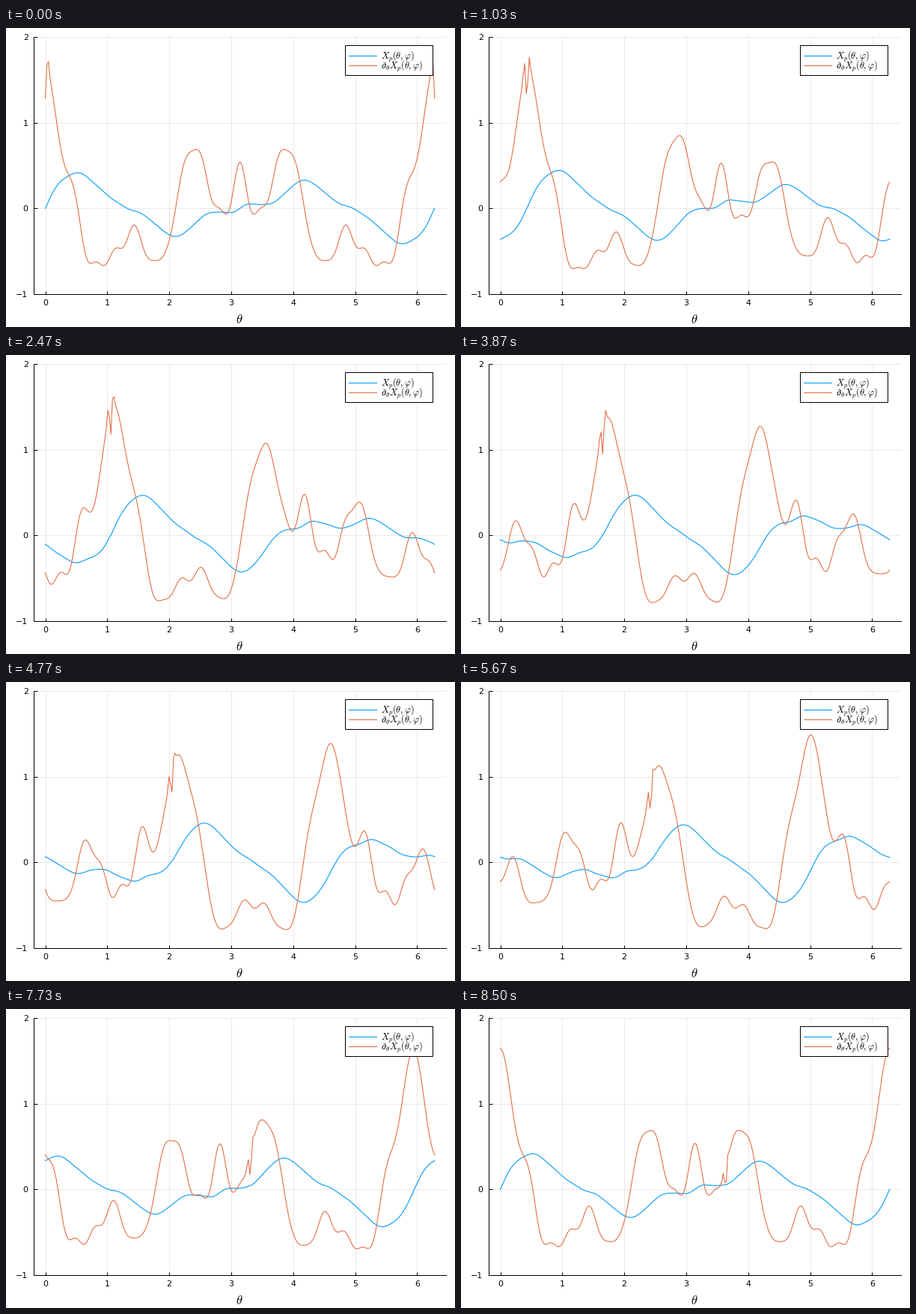
A matplotlib script that plays this animation: 600 px wide and 400 px high, repeating every 8.53 s.

```python
import numpy as np
import matplotlib.pyplot as plt
from matplotlib.animation import FuncAnimation
from matplotlib.lines import Line2D
from matplotlib.patches import Rectangle

W, H, DPI = 600, 400, 100
FRAMES, LOOP = 256, 8530
BLUE, ORANGE = "#009afa", "#e26f46"
PX = 72 / DPI  # one pixel in points

plt.rcParams.update({
    "font.family": "DejaVu Sans",
    "mathtext.fontset": "cm",
    "axes.unicode_minus": True,
})

# Travelling modes: (wave number in theta, wave number in phi, slope amplitude)
MODES = np.array([
    (1, 1, -0.025), (2, 1, 0.54), (3, 2, 0.41), (4, 2, 0.095),
    (5, 3, 0.354), (6, 4, 0.086), (7, 4, -0.14), (8, 5, 0.152),
    (9, 5, -0.03), (10, 6, 0.043), (12, 7, 0.06), (13, 8, 0.035),
    (14, 8, 0.058), (16, 9, 0.02), (17, 10, 0.013), (18, 10, 0.018),
    (19, 11, -0.045), (21, 12, -0.02), (22, 13, 0.02),
])
N, M, A = (col[:, None] for col in MODES.T)
SPEED = 11 / 19
KINK_WIDTH = 0.023

theta = np.linspace(0, 2 * np.pi, 256)


def curves(i):
    """Return X_p and its theta derivative at step i."""
    u = i / (FRAMES - 1)
    phi = 2 * np.pi * u
    phase = N * theta - M * phi
    x = (A / N * np.sin(phase)).sum(axis=0)
    dx = (A * np.cos(phase)).sum(axis=0)

    # narrow kink carried along the characteristic
    d = (theta - SPEED * phi + np.pi) % (2 * np.pi) - np.pi
    s = (d / KINK_WIDTH) ** 2
    bell = (0.36 - 0.17 * u) * np.exp(-s / 2)
    return x - d * bell, dx - (1 - s) * bell


def at(x, y):
    """Pixel position (from top left) to figure fraction."""
    return x / W, 1 - y / H


fig = plt.figure(figsize=(W / DPI, H / DPI), dpi=DPI, facecolor="white")

# axes
left, right, top, bottom = 36.9, 588.4, 12, 355.8
ax = fig.add_axes([left / W, 1 - bottom / H, (right - left) / W, (bottom - top) / H])
margin = 0.03 * 2 * np.pi
ax.set_xlim(-margin, 2 * np.pi + margin)
ax.set_ylim(-1, 2)
ax.set_xticks(range(7))
ax.set_yticks(range(-1, 3))
ax.set_axisbelow(True)
ax.grid(color="black", alpha=0.1, lw=0.6)
ax.tick_params(direction="in", length=4.5 * PX, width=PX, labelsize=11 * PX)
ax.tick_params(axis="x", pad=7 * PX)
ax.tick_params(axis="y", pad=7.3 * PX)
for side in ("top", "right"):
    ax.spines[side].set_visible(False)
for side in ("left", "bottom"):
    ax.spines[side].set_linewidth(PX)
fig.text(*at(312, 390), r"$\theta$", size=16.7 * PX, ha="center", va="center")

# curves
line_x, = ax.plot([], [], color=BLUE, lw=1.1 * PX)
line_dx, = ax.plot([], [], color=ORANGE, lw=1.1 * PX)

# legend
x0, y0 = at(452.5, 62.5)
fig.add_artist(Rectangle((x0, y0), 117.5 / W, 39 / H, fc="white", ec="black",
                         lw=PX, transform=fig.transFigure))
for y, color, label in (
    (36.5, BLUE, r"$X_p(\theta,\varphi)$"),
    (49.5, ORANGE, r"$\partial_\theta X_p(\theta,\varphi)$"),
):
    xs, ys = zip(at(458, y), at(495, y))
    fig.add_artist(Line2D(xs, ys, color=color, lw=1.1 * PX))
    fig.text(*at(501, y + 4.3), label, size=12.2 * PX, va="baseline")


def update(i):
    x, dx = curves(i)
    line_x.set_data(theta, x)
    line_dx.set_data(theta, dx)
    return line_x, line_dx


anim = FuncAnimation(fig, update, frames=FRAMES, interval=LOOP / FRAMES,
                     init_func=lambda: update(0), repeat=True, repeat_delay=0)
plt.show()
```
